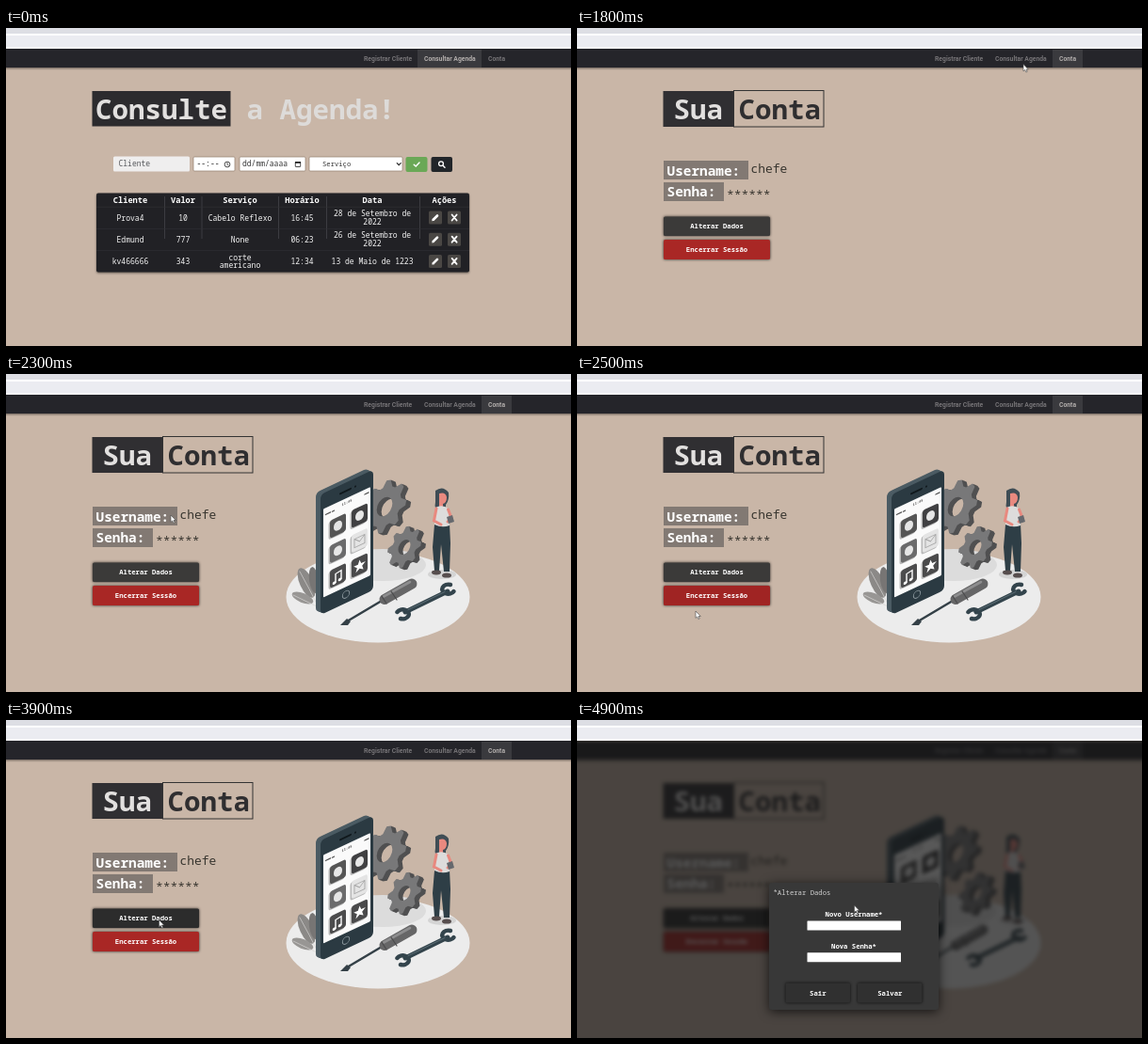
An HTML page for the animation above (5 s loop, 600 by 338 pixels).

```html
<!DOCTYPE html>
<html lang="pt">
<head>
<meta charset="utf-8">
<title>Agenda</title>
<style>
  html, body { margin: 0; width: 100%; height: 100%; overflow: hidden; background: #c9b6a7; }
  svg { display: block; width: 600px; height: 338px; }
  text { font-family: 'Roboto Mono', 'Noto Sans Mono', 'DejaVu Sans Mono', monospace; white-space: pre; }
  filter { color-interpolation-filters: sRGB; }
  .nav { font: bold 6.8px Roboto, 'Open Sans', sans-serif; }
</style>
</head>
<body>
<svg id="stage" viewBox="0 0 600 338" xmlns="http://www.w3.org/2000/svg"></svg>
<script>
const LOOP = 5000, STEP = 100;

// ---- markup helpers ----
const box = (x, y, w, h, fill, r = 0, more = '') =>
  `<rect x="${x}" y="${y}" width="${w}" height="${h}" rx="${r}" fill="${fill}" ${more}/>`;
const path = (d, fill = 'none', more = '') => `<path d="${d}" fill="${fill}" ${more}/>`;
const line = (d, color, w = 1, more = '') =>
  path(d, 'none', `stroke="${color}" stroke-width="${w}" stroke-linecap="round" ${more}`);
const oval = (x, y, rx, ry, fill, more = '') =>
  `<ellipse cx="${x}" cy="${y}" rx="${rx}" ry="${ry}" fill="${fill}" ${more}/>`;
const text = (x, y, s, size, fill, weight = 400, anchor = 'start') =>
  `<text x="${x}" y="${y}" font-size="${size}" fill="${fill}" font-weight="${weight}" text-anchor="${anchor}">${s}</text>`;
const mid = (x, y, s, size, fill, weight) => text(x, y, s, size, fill, weight, 'middle');
const group = (id, inner, more = '') => `<g ${id && `id="${id}"`} ${more}>${inner}</g>`;

// ---- navigation ----
function navBar() {
  const item = (id, x, s) => `<text id="${id}" class="nav" x="${x}" y="34.6">${s}</text>`;
  return box(-20, 22, 640, 20, '#25252a', 0, 'filter="url(#soft)"') +
    `<rect id="tabAgenda" x="437" y="23" width="68" height="19"/>` +
    `<rect id="tabConta" x="505" y="23" width="32" height="19"/>` +
    item('navCliente', 380, 'Registrar Cliente') +
    item('navAgenda', 444, 'Consultar Agenda') +
    item('navConta', 512, 'Conta');
}

const browserStrip = () =>
  box(0, 0, 600, 22, '#fff') + box(0, 0, 600, 6, '#dddee4') + box(0, 8, 600, 12, '#ebecf1');

// ---- schedule page ----
function searchForm() {
  const field = (x, w) => box(x, 137, w, 15, '#fff', 1, 'stroke="#94806f" stroke-width=".7"');
  return box(114, 136.5, 81, 16, '#efeeee', 1.5) + text(119.5, 147.2, 'Cliente', 8, '#55575b') +
    field(199, 44) + text(202.5, 147.2, '--:--', 8, '#222') +
    `<circle cx="235" cy="145" r="2.9" fill="none" stroke="#222" stroke-width=".8"/>` +
    line('M235 143.2V145L236.3 146', '#222', .7) +
    field(248, 70) + text(251, 147.2, 'dd/mm/aaaa', 8, '#333') +
    box(307.3, 142.5, 5.4, 5, 'none', .4, 'stroke="#222" stroke-width=".8"') +
    box(307, 142, 6, 1.8, '#222') +
    field(322, 99) + text(336, 147.2, 'Serviço', 7.2, '#333') +
    line('M415.2 143.6L417.2 145.7L419.2 143.6', '#222', 1.1) +
    box(424.5, 137, 23, 16, '#6aa856', 2) +
    line('M433.2 145.2L435.2 147L439 143', '#fff', 1.4) +
    box(451.5, 137, 22.5, 16, '#212529', 2) +
    `<circle cx="462" cy="144.2" r="2.4" fill="none" stroke="#fff" stroke-width="1.3"/>` +
    line('M464 146.2L466 148.2', '#fff', 1.5);
}

function table() {
  const cols = [132, 188, 248.5, 314.5, 389, 465.5];
  const heads = ['Cliente', 'Valor', 'Serviço', 'Horário', 'Data', 'Ações'];
  const rows = [
    ['Prova4', '10', 'Cabelo Reflexo', '16:45', '28 de Setembro de|2022'],
    ['Edmund', '777', 'None', '06:23', '26 de Setembro de|2022'],
    ['kv466666', '343', 'corte|americano', '12:34', '13 de Maio de 1223']
  ];
  let out = box(96, 175.5, 396, 84, '#212125', 2, 'filter="url(#soft)"');
  for (const x of [168.5, 208, 289.5, 340.5, 439.5]) out += box(x - .4, 179, .8, 45, '#45454a');
  heads.forEach((h, i) => out += mid(cols[i], 186, h, 8.7, '#fff', 700));
  rows.forEach((row, r) => {
    const cy = 201.5 + 23.2 * r;
    out += box(96, cy - 11.6, 396, .6, '#303035');
    row.forEach((cell, c) => {
      const parts = cell.split('|');
      parts.forEach((s, k) =>
        out += mid(cols[c], cy + 3 + (k - (parts.length - 1) / 2) * 8.6, s, 8.05, '#f4f4f4', 500));
    });
    out += box(449, cy - 7, 14, 14, '#4a4744', 1.5) + box(469, cy - 7, 14, 14, '#4a4744', 1.5) +
      line(`M454 ${cy + 2}L458 ${cy - 2}`, '#fff', 2.6) +
      path(`M452.3 ${cy + 3.7}l.5 -2.6l2.2 2.2z`, '#fff') +
      line(`M473.6 ${cy - 3}l5 6m0 -6l-5 6`, '#fff', 1.8);
  });
  return out;
}

const agendaPage = () =>
  box(91.5, 67, 147, 37.5, '#2c2b2e') +
  text(95, 97, 'Consulte', 29.2, '#e2e0df', 700) +
  text(255.5, 97, 'a Agenda!', 29.2, '#dddbd9', 700) +
  searchForm() + table();

// ---- illustration ----
function gearPath(r, teeth) {
  const n = teeth * 4, pts = [];
  for (let i = 0; i < n; i++) {
    const a = (i + .5) / n * Math.PI * 2, q = i % 4 < 2 ? r : r * .76;
    pts.push((Math.cos(a) * q).toFixed(1) + ' ' + (Math.sin(a) * q).toFixed(1));
  }
  const h = r * .36;
  return `M${pts.join('L')}Z M${h} 0A${h} ${h} 0 1 0 ${-h} 0A${h} ${h} 0 1 0 ${h} 0Z`;
}

function gear(x, y, r) {
  const d = gearPath(r, 8);
  const face = (dx, dy, fill) =>
    path(d, fill, `fill-rule="evenodd" transform="matrix(.86 -.36 0 1 ${x + dx} ${y + dy})"`);
  return [5, 4, 3, 2, 1].map(k => face(k, k * .4, '#505051')).join('') + face(0, 0, '#787879');
}

function phone() {
  const body = fill => box(0, 0, 56, 128, fill, 5);
  const skew = (dx, dy) => `transform="matrix(1 -.47 0 1 ${334 + dx} ${128 + dy})"`;
  const tones = ['#555', '#404042', '#6b6b6c', '#e4e4e4', '#4c4c4d', '#4a4a4b'];
  let icons = '';
  tones.forEach((tone, i) => {
    const x = 10 + 23 * (i % 2), y = 32.5 + 26.5 * (i >> 1);
    icons += box(x - 1.5, y + 1, 17, 19, '#b9b9b9', 2.5) + box(x, y, 17, 19, tone, 2.5);
    if (i < 3) icons += oval(x + 8.5, y + 9.5, 4.5, 5, '#e6e6e6');
  });
  icons += line('M36 64.5h11v9h-11zl5.5 5l5.5 -5', '#a5a5a5', .9) +
    line('M16 101v-9l6 -1v9', '#fff', 1.4) + oval(14.6, 101, 1.9, 1.6, '#fff') + oval(20.6, 100, 1.9, 1.6, '#fff') +
    path('M41.5 89l1.7 4.4h4.6l-3.6 3l1.4 4.6l-4.1 -2.7l-4.1 2.7l1.4 -4.6l-3.6 -3h4.6z', '#fff');
  let out = '';
  for (let k = 5; k > 0; k--) out += group('', body('#4b5b63'), skew(-k, -k * .4));
  return out + group('', body('#2b3a42') + box(3, 17, 50, 94, '#fafafa', 1) +
    box(20, 8, 13, 2, '#10181c', 1) + oval(37, 9, 1, 1, '#10181c') +
    line('M5.5 24h5m2 0h2M47 22h4', '#555', 1.4) + mid(28, 23, '11:45', 3.6, '#555', 700) +
    `<circle cx="27" cy="119" r="3.7" fill="none" stroke="#8b979d" stroke-width=".9"/>` + icons, skew(0, 0));
}

const plant = () =>
  oval(319, 222, 7, 17, '#8b8987', 'transform="rotate(-24 319 222)"') +
  oval(327, 219, 5, 14, '#777574', 'transform="rotate(-8 327 219)"') +
  oval(315, 238, 12, 5, '#989694', 'transform="rotate(22 315 238)"') +
  line('M312 210Q322 228 332 248M305 235L330 247', '#d5d3d1', .7);

const driver = () =>
  line('M362 263L399 241', '#344047', 2.4) + path('M355 267l7 -7l4 3l-3 4z', '#344047') +
  line('M402 239.5L431 223', '#666667', 11) + line('M401 236.5L429 221', '#8d8d8e', 2.6) +
  line('M399 236l5 8M409 231l6 9', '#4b4b4c', 1.2);

const wrench = () =>
  line('M424 253L469 231', '#33444c', 5) +
  line('M415.5 253A6.5 5 0 1 1 419 260', '#33444c', 4.5) +
  line('M475.5 231A6.5 5 0 1 1 472 224', '#33444c', 4.5) +
  line('M427 250.6L466 231.5', '#5d6e76', 1);

const woman = () =>
  oval(463, 213, 15, 5, '#d4d4d4') +
  path('M456 124Q464 118 470 126Q471 134 467 139Q468 145 461 146Q454 145 456 136Z', '#3f4d55') +
  path('M460 127Q467 125 468 131Q468 137 464 138L464 143H460Z', '#e8897f') +
  path('M455 160L453 184L455 209H460L462 181L465 210H471L472 180L471 159Z', '#2e3e46') +
  path('M456 142Q463 138 470 143L471 161Q463 164 455 160Z', '#dddcdb') +
  line('M457 143L454.5 156L462 160M469.5 144L473 153L469 157', '#e8897f', 3) +
  path('M468 152l6 -2l2 7l-6 2z', '#65686d') +
  oval(457, 211, 5, 2.4, '#574e4e') + oval(468, 214, 5, 2.6, '#574e4e');

// name, then offset, extra scale and opacity half way through the entrance, drawing
const PARTS = [
  ['floor', -20, -6, .1, .6, oval(395, 237, 97.5, 48.5, '#ececec')],
  ['shade', 46, 6, 0, .5, oval(400, 203, 46, 17, '#dcdcdc')],
  ['plant', 3, -12, 0, .45, plant()],
  ['gears', 13, 0, 0, .9, gear(402, 141, 27) + gear(423, 184, 21)],
  ['phone', 7, 1, 0, .55, phone()],
  ['driver', 2, 9, 0, .5, driver()],
  ['wrench', 11, -3, 0, .55, wrench()],
  ['woman', -8, 0, 0, .7, woman()]
];

// ---- account page ----
const accountPage = () =>
  box(91.5, 67, 75, 38, '#302f32') + text(102.5, 97, 'Sua', 29.2, '#e2e0df', 700) +
  box(166.5, 66.5, 95.5, 38.5, 'none', 0, 'stroke="#333" stroke-width="1"') +
  text(171.5, 97, 'Conta', 29.2, '#2f2e30', 700) +
  box(92, 141, 90, 20, '#827973') + text(95.5, 156.5, 'Username:', 14.4, '#fff', 700) +
  text(184.5, 153.5, 'chefe', 12.9, '#38352f', 300) +
  box(92, 164, 64, 20, '#827973') + text(95.5, 179, 'Senha:', 14.4, '#fff', 700) +
  text(159, 182, '******', 12.9, '#38352f', 300) +
  `<rect id="edit" x="92" y="200.5" width="113" height="20.5" rx="1.5" filter="url(#halo)"/>` +
  mid(148.5, 213.3, 'Alterar Dados', 7.25, '#fff', 700) +
  `<rect id="leave" x="92" y="225" width="113" height="21" rx="1.5" filter="url(#halo)"/>` +
  mid(148.5, 238.2, 'Encerrar Sessão', 7.25, '#fff', 700) +
  group('art', PARTS.map(p => group(p[0], p[5])).join(''), 'clip-path="url(#frame)"');

function dialog() {
  const button = (x, s) =>
    box(x, 279.5, 68.5, 21, '#303030', 1.5, 'filter="url(#halo)"') + mid(x + 34.3, 292.7, s, 7.25, '#fff', 700);
  const input = y => box(244.5, y, 99.5, 10, '#fff', .5);
  return box(204, 173, 180, 135, '#383838', 3, 'filter="url(#deep)"') +
    text(208.5, 185.5, '*Alterar Dados', 7.25, '#cfcfcf') +
    mid(294, 208.8, 'Novo Username*', 7.25, '#fff', 700) + input(213.5) +
    mid(294, 242.5, 'Nova Senha*', 7.25, '#fff', 700) + input(247.3) +
    button(221.5, 'Sair') + button(298, 'Salvar');
}

// ---- pointer ----
const outline = 'stroke="#444" stroke-width=".6" stroke-linejoin="round"';
const arrow = () => path('M0 0V7.4L1.7 5.9L2.9 8.5L4.2 7.9L3 5.5H5.3Z', '#fff', outline);
const hand = () =>
  path('M-1 .8Q0 -.8 1 .8V4L5 4.8Q6.4 5.2 6 7L5 10H0L-2.8 6.4Q-2.8 5 -1 6Z', '#fff', outline);

const TRACK = [
  [800, 573, 96], [1200, 518, 37], [1700, 518, 37], [1900, 430, 40], [2100, 261, 48],
  [2300, 175, 150], [2500, 126, 252], [2800, 63, 250], [3000, 95, 246], [3300, 148, 220],
  [3500, 162.5, 212.5], [4400, 162.5, 212.5], [4900, 294.5, 197], [5000, 294.5, 197]
];

function pointerAt(t) {
  const i = TRACK.findIndex(p => p[0] > t);
  const [t0, x0, y0] = TRACK[i - 1], [t1, x1, y1] = TRACK[i];
  const k = (t - t0) / (t1 - t0);
  return [x0 + (x1 - x0) * k, y0 + (y1 - y0) * k];
}

// ---- stage ----
document.getElementById('stage').innerHTML =
  `<defs>
    <filter id="soft" x="-20%" y="-50%" width="140%" height="200%">
      <feDropShadow dx="0" dy="1" stdDeviation="1.3" flood-color="#000" flood-opacity=".5"/></filter>
    <filter id="halo" x="-20%" y="-60%" width="140%" height="220%">
      <feDropShadow dx="0" dy="0" stdDeviation="1.6" flood-color="#000" flood-opacity=".8"/></filter>
    <filter id="deep" x="-20%" y="-20%" width="140%" height="140%">
      <feDropShadow dx="0" dy="2" stdDeviation="6" flood-color="#000" flood-opacity=".7"/></filter>
    <filter id="haze" filterUnits="userSpaceOnUse" x="-20" y="-20" width="640" height="378">
      <feGaussianBlur stdDeviation="1.9"/></filter>
    <clipPath id="frame"><rect x="294" y="60" width="206" height="240"/></clipPath>
  </defs>` +
  group('page', box(-20, -20, 640, 378, '#c9b6a7') + group('agenda', agendaPage()) +
    group('account', accountPage()) + navBar()) +
  group('modal', box(0, 22, 600, 316, 'rgba(20,20,20,.7)') + dialog()) +
  browserStrip() +
  group('pointer', group('arrow', arrow()) + group('hand', hand()));

const $ = id => document.getElementById(id);
const show = (id, on) => $(id).setAttribute('display', on ? 'inline' : 'none');
const paint = (id, color) => $(id).setAttribute('fill', color);
const move = (id, x, y, scale = 1) =>
  $(id).setAttribute('transform', `translate(${x.toFixed(2)} ${y.toFixed(2)}) scale(${scale.toFixed(3)})`);
const clamp = v => Math.max(0, Math.min(1, v));

function enter(p) {
  const away = 2 * (1 - p);
  for (const [id, dx, dy, grow, half] of PARTS) {
    const extra = grow * away;
    move(id, dx * away - extra * 395, dy * away - extra * 237, 1 + extra);
    $(id).setAttribute('opacity', p < .5 ? half * 2 * p : half + (1 - half) * (2 * p - 1));
  }
}

function render(t) {
  const account = t >= 1800, modal = t >= 4000, onConta = t >= 1200 && !account;
  show('agenda', !account);
  show('account', account);
  show('modal', modal);
  if (modal) $('page').setAttribute('filter', 'url(#haze)');
  else $('page').removeAttribute('filter');

  paint('tabAgenda', account ? 'none' : '#3a3a3e');
  paint('tabConta', account ? '#3a3a3e' : onConta ? '#303034' : 'none');
  paint('navCliente', '#757376');
  paint('navAgenda', account ? '#757376' : '#b3aeac');
  paint('navConta', account ? '#b0acaa' : onConta ? '#aaa6a4' : '#757376');

  enter(clamp((t - 1900) / 400));

  paint('edit', t >= 3400 ? '#2c2c2c' : '#3b3a39');
  paint('leave', t >= 2500 && t < 2600 ? '#a02423' : '#a92725');

  show('pointer', t >= 800);
  if (t >= 800) {
    const [x, y] = pointerAt(t), link = t >= 1300 && t < 1800;
    move('pointer', x, y);
    show('hand', link);
    show('arrow', !link);
  }
}

const start = performance.now();
function tick() {
  const t = (performance.now() - start) % LOOP;
  render(Math.floor(t / STEP) * STEP);
  requestAnimationFrame(tick);
}
tick();
</script>
</body>
</html>
```
